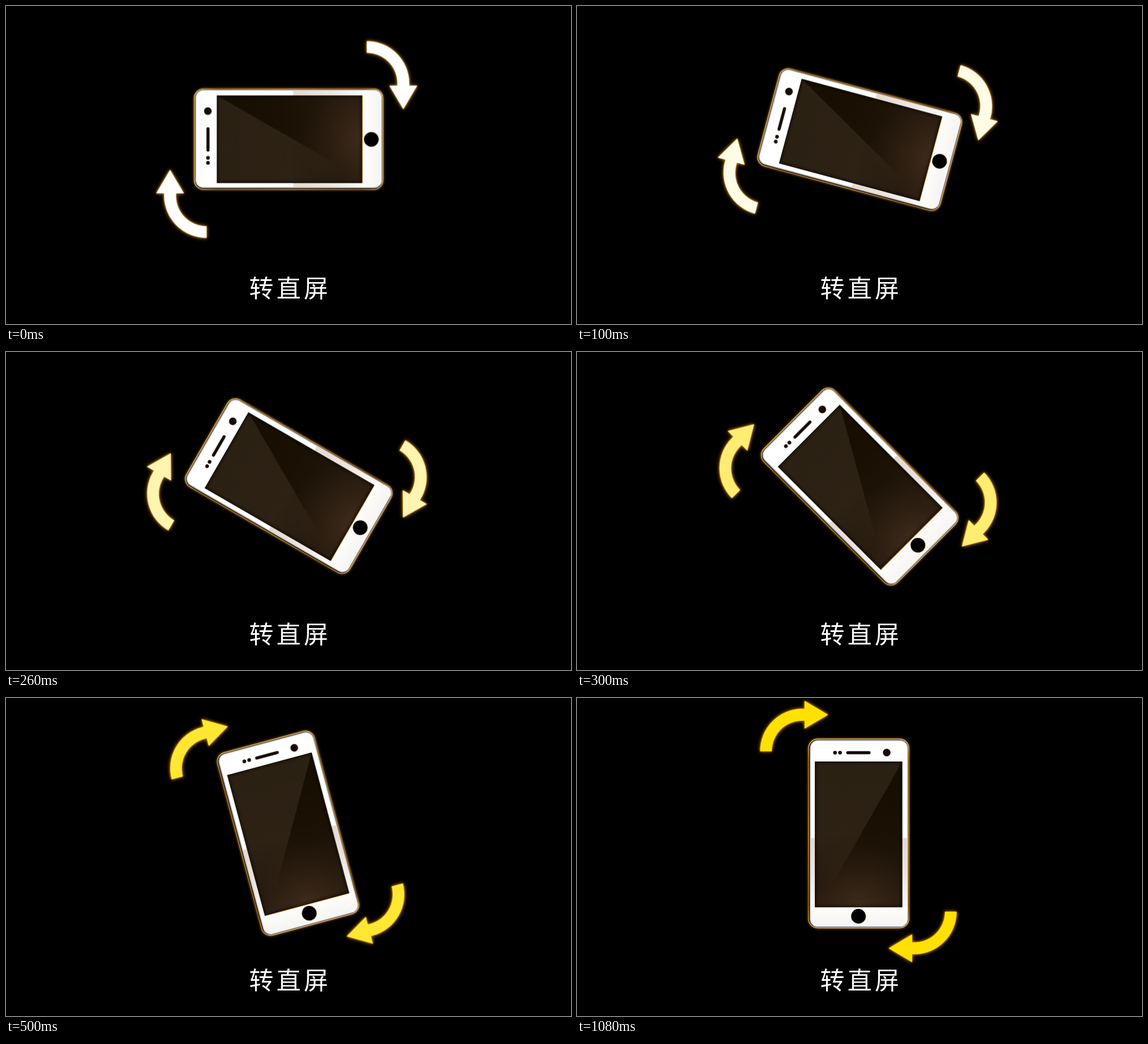
These frames come from a looping animation (998x561 px, 1.4 s). An HTML page:

```html
<!DOCTYPE html>
<html lang="zh-CN">
<head>
<meta charset="utf-8">
<title>转直屏</title>
<style>
  html, body { margin: 0; width: 100%; height: 100%; overflow: hidden; background: #000; }
  svg { display: block; width: 100%; height: 100%; }
  text { font: 500 43px "Noto Sans CJK SC", "Noto Sans CJK", sans-serif; letter-spacing: 5.3px; fill: #fff; }
  #arrows { filter: drop-shadow(0 0 1.5px #e09a1c) drop-shadow(0 0 3px #a8690c); }
  #rim { filter: drop-shadow(0 0 2px #b87a14); }
</style>
</head>
<body>
<svg viewBox="0 0 998 561">
  <defs>
    <linearGradient id="gold" x1="0" y1="0" x2="0" y2="1">
      <stop offset="0" stop-color="#ffc976"/>
      <stop offset=".12" stop-color="#b87a20"/>
      <stop offset=".5" stop-color="#d39a3c"/>
      <stop offset=".88" stop-color="#a56d1c"/>
      <stop offset="1" stop-color="#f0b85c"/>
    </linearGradient>
    <linearGradient id="side" x1="0" y1="0" x2="0" y2="1">
      <stop offset="0" stop-color="#e6dad0"/>
      <stop offset=".55" stop-color="#eee6e0"/>
      <stop offset="1" stop-color="#fbf9f7"/>
    </linearGradient>
    <linearGradient id="chin" x1="0" y1="0" x2="0" y2="1">
      <stop offset="0" stop-color="#fffdf8"/>
      <stop offset="1" stop-color="#f4f4f4"/>
    </linearGradient>
    <linearGradient id="glass" x1="0" y1="0" x2="0" y2="1">
      <stop offset="0" stop-color="#160d01"/>
      <stop offset=".45" stop-color="#1a1004"/>
      <stop offset="1" stop-color="#281b0f"/>
    </linearGradient>
    <radialGradient id="warm" gradientUnits="userSpaceOnUse" cx="498" cy="372" r="115">
      <stop offset="0" stop-color="#4a3420" stop-opacity=".7"/>
      <stop offset="1" stop-color="#33241a" stop-opacity="0"/>
    </radialGradient>
    <linearGradient id="sheen" x1="0" y1="0" x2="0" y2="1">
      <stop offset="0" stop-color="#ffeacc" stop-opacity=".09"/>
      <stop offset=".5" stop-color="#ffeacc" stop-opacity=".08"/>
      <stop offset=".85" stop-color="#ffeacc" stop-opacity="0"/>
    </linearGradient>
    <filter id="soft"><feGaussianBlur stdDeviation="3"/></filter>
    <clipPath id="screen"><rect x="420.5" y="112" width="154.5" height="257"/></clipPath>
    <path id="arrow" d="M323.5 94A74.5 75 0 0 1 398 19H402V5L443.5 29.5L402 54V40H398A54 54 0 0 0 344 94Z"/>
  </defs>

  <rect width="998" height="561"/>

  <g id="spinner">
    <g id="arrows">
      <use href="#arrow"/>
      <use href="#arrow" transform="rotate(180 497 235.5)"/>
    </g>

    <g transform="translate(-.4 0)">
      <rect id="rim" x="409.5" y="72.5" width="177" height="333" rx="16" stroke="url(#gold)" stroke-width="1.4"/>
      <rect x="412.3" y="74.8" width="172.4" height="328.9" rx="13.5" fill="#fff" stroke="#9c9ca6" stroke-width="1.5"/>
      <path d="M413 247H584V369H413Z" fill="url(#side)"/>
      <path d="M413 369H584V390A13 13 0 0 1 571 403H426A13 13 0 0 1 413 390Z" fill="url(#chin)"/>

      <g clip-path="url(#screen)">
        <rect x="420" y="112" width="156" height="258" fill="url(#glass)"/>
        <rect x="420" y="112" width="156" height="258" fill="url(#warm)"/>
        <path d="M420 112H575L428 369H420Z" fill="url(#sheen)"/>
        <rect x="419" y="110.5" width="157.5" height="260" fill="none" stroke="#0a0500" stroke-opacity=".75" stroke-width="6" filter="url(#soft)"/>
      </g>
      <path d="M420.5 369.5H575" stroke="#e8b95e"/>

      <g fill="#160c04">
        <circle cx="547.5" cy="96.3" r="6.7"/>
        <circle cx="456.2" cy="96.5" r="3.3"/>
        <circle cx="465" cy="96.5" r="3.3"/>
        <rect x="476" y="93.7" width="43" height="5.6" rx="2.8"/>
      </g>
      <circle cx="498" cy="385.6" r="13" fill="#edc67c"/>
      <circle cx="497.5" cy="385" r="12.9"/>
    </g>
  </g>

  <text x="429.5" y="513.8">转直屏</text>
</svg>
<script>
  const LOOP = 1400, STEP = 100, LAST = 6;
  const arrowColors = ['#ffffff', '#fffce6', '#fff4b0', '#ffed71', '#ffe954', '#ffe732', '#ffe100'];
  const spinner = document.getElementById('spinner');
  const arrows = document.getElementById('arrows');

  // Quarter turn in 15° steps, then hold upright.
  function draw() {
    const step = Math.min(LAST, Math.floor(performance.now() % LOOP / STEP));
    spinner.setAttribute('transform', `rotate(${15 * (step - LAST)} 496.4 236.1)`);
    arrows.setAttribute('fill', arrowColors[step]);
    requestAnimationFrame(draw);
  }
  draw();
</script>
</body>
</html>
```
